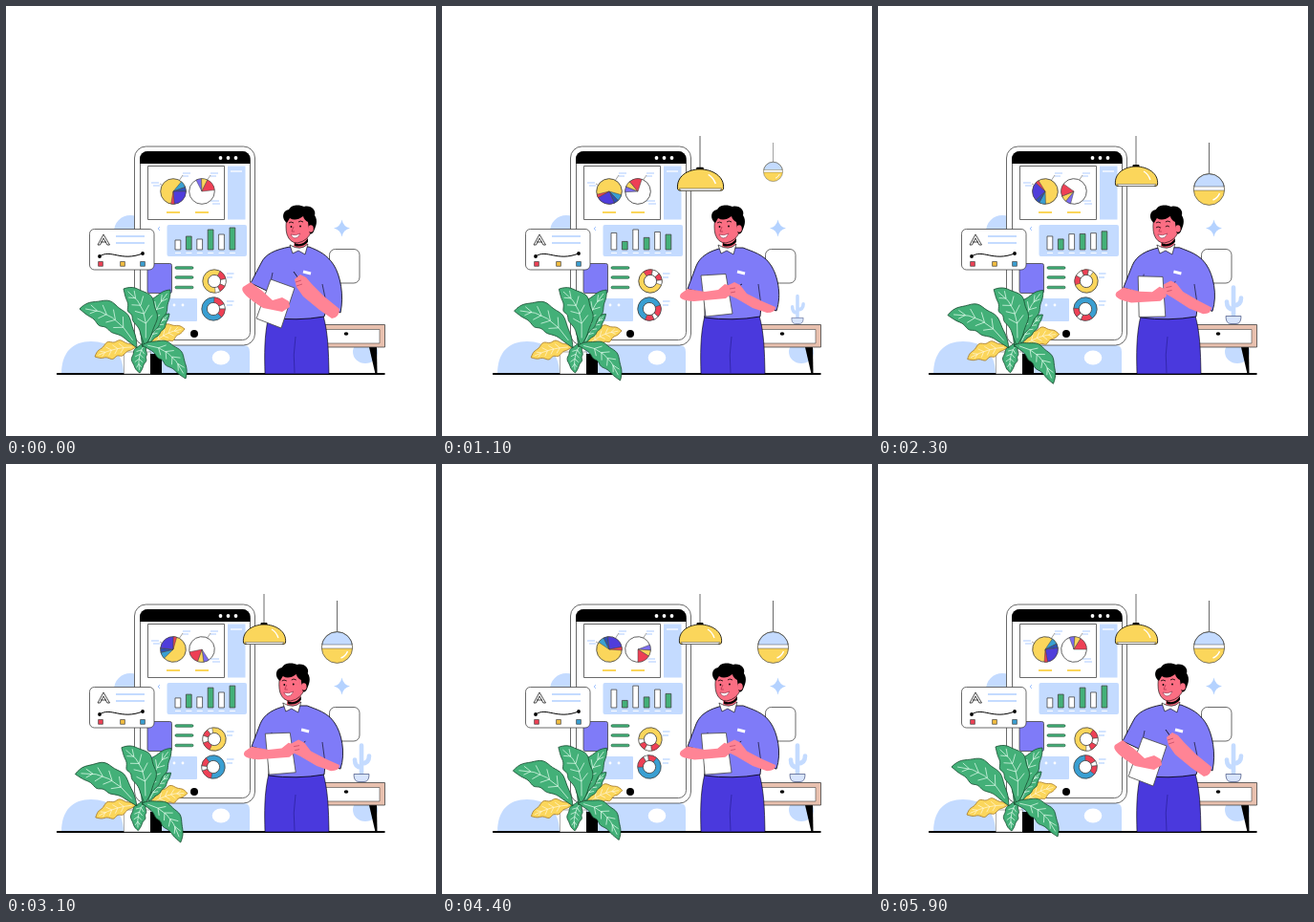
An HTML page with a canvas for the animation above (6 s loop, 450 by 450 pixels).

```html
<!DOCTYPE html>
<html lang="en">
<head>
<meta charset="utf-8">
<title>Dashboard presentation</title>
<style>
html, body { margin: 0; width: 100%; height: 100%; overflow: hidden; background: #fff }
canvas { display: block; width: 450px; height: 450px }
</style>
</head>
<body>
<canvas id="stage"></canvas>
<script>
const LOOP = 6000, TAU = Math.PI * 2, RAD = Math.PI / 180;
const INK = '#000', FRAME = '#444', SKY = '#c4dbff', SHIRT = '#7f7bf8', PANTS = '#4a39dd', FACE = '#fb6e83',
  SKIN = '#ff8495', YELLOW = '#fbd65b', GREEN = '#43b078', RED = '#ee4055', BLUE = '#3a9fd2', PURPLE = '#4f3ddb';
const canvas = document.getElementById('stage'), ctx = canvas.getContext('2d');
const dpr = window.devicePixelRatio || 1;
canvas.width = canvas.height = 450 * dpr;

function paint(path, fill, stroke, width = 0.8) {
  if (fill) { ctx.fillStyle = fill; ctx.fill(path); }
  if (stroke) { ctx.strokeStyle = stroke; ctx.lineWidth = width; ctx.stroke(path); }
}
const shape = (d, fill, stroke, width) => paint(new Path2D(d), fill, stroke, width);
const line = (d, color = INK, width = 0.8) => shape(d, null, color, width);
function box(x, y, w, h, r, fill, stroke, width) {
  const p = new Path2D();
  p.roundRect(x, y, w, h, r);
  paint(p, fill, stroke, width);
}
function oval(x, y, rx, ry, fill, stroke, width) {
  const p = new Path2D();
  p.ellipse(x, y, rx, ry, 0, 0, TAU);
  paint(p, fill, stroke, width);
}
function placed(x, y, angle, scale, draw) {
  ctx.save();
  ctx.translate(x, y);
  ctx.rotate(angle * RAD);
  ctx.scale(scale, scale);
  draw();
  ctx.restore();
}
// Blends two path strings with the same commands.
function blend(a, b, k) {
  const nums = b.match(/-?[\d.]+/g);
  let i = 0;
  return a.replace(/-?[\d.]+/g, n => (+n + (nums[i++] - n) * k).toFixed(2));
}
const smooth = k => k * k * (3 - 2 * k);
function keyed(keys, t) {
  const i = keys.findIndex(k => k[0] > t);
  if (i < 0) return keys[keys.length - 1][1];
  const [t0, a] = keys[i - 1], [t1, b] = keys[i];
  return a + (b - a) * smooth((t - t0) / (t1 - t0));
}
function pop(t, start, length) {
  const k = Math.min(1, (t - start) / length) - 1;
  return k <= -1 ? 0 : 1 + 2.7 * k ** 3 + 1.7 * k ** 2;
}

// Slices are [from, to, color] in degrees; an inner radius makes a ring.
function pie(x, y, r, inner, base, slices, turn) {
  placed(x, y, turn, 1, () => {
    oval(0, 0, r, r, base, FRAME);
    for (const [from, to, color] of slices) {
      const p = new Path2D();
      p.moveTo(0, 0);
      p.arc(0, 0, r, from * RAD, to * RAD);
      p.closePath();
      paint(p, color, FRAME, 0.5);
    }
    if (inner) oval(0, 0, inner, inner, '#fff', FRAME);
  });
}

function backdrop() {
  shape('M58 385C58 362 70 351 89 351S123 362 123 385Z', SKY);
  shape('M150 385V355H249Q255 355 255 362V385Z', SKY);
  oval(225, 368, 9.3, 7.5, '#fff');
  oval(130, 236, 17, 17, SKY);
  oval(376, 362, 13, 12, SKY);
  shape('M351.500 223.500Q353 231 360 232.500Q353 234 351.500 241.500Q350 234 343 232.500Q350 231 351.500 223.500Z', '#b4d2ff');
  line('M53 385H396.500', INK, 1.8);
}

function phone(t) {
  const turn = t / LOOP * 360;
  box(134.5, 147, 126, 208, 12, '#fff', FRAME);
  box(140.5, 152.5, 115, 197, 8, '#fff', FRAME);
  box(140, 152, 115.5, 13, [8, 8, 0, 0], INK);
  for (const x of [224.5, 232.5, 240.5]) oval(x, 159, 1.9, 1.9, '#fff');
  oval(197, 343, 4, 4, INK);

  box(148.5, 167.5, 80, 56, 0, '#fff', FRAME);
  box(232, 167.5, 18.5, 56, 0, SKY);
  line('M235 173H247', '#fff', 1.3);
  line('M152 185H160M154 188H161M185 175H193M185 178H191M214 175H222M214 178H220M214 204H223M216 207H224', '#a4c6ff', 0.9);
  line('M161 186L166 189M185 177L181 183M214 177L210 183', FRAME, 0.5);
  line('M168 216H182M198 216H212', YELLOW, 1.8);
  pie(175, 194, 13.3, 0, YELLOW,
    [[-50, -20, BLUE], [-20, 0, '#2d50b5'], [0, 85, PURPLE], [85, 100, RED]], turn);
  pie(205, 194, 13.3, 0, '#fff',
    [[-117, -92, '#7b6cf0'], [-92, -64, YELLOW], [-64, -6, RED]], -turn);

  line('M161 231L159 233L161 235', '#8fb8ff');
  box(168.500, 229, 83.5, 33, 2, SKY);
  const wave = (1 - Math.cos(t / 3000 * TAU)) / 2;
  [[245, 236], [241, 247.5], [244, 232], [234, 244], [239, 236], [232, 240.5]].forEach(([low, high], i) => {
    const x = 177 + i * 11.4, top = low + (high - low) * wave;
    box(x, top, 5.8, 255 - top, 0, i % 2 ? GREEN : '#fff', FRAME, 0.8);
    line(`M${x} 258.500h6`, '#fff', 1);
  });

  box(148, 269.5, 25.5, 31, 2, SHIRT, FRAME);
  for (const y of [274, 284, 294.5]) box(177, y - 1.3, 19, 2.6, 1.3, GREEN, '#174d30', 0.6);
  pie(218, 288, 12.2, 6.6, YELLOW,
    [[-60, -12, RED], [-12, 25, '#fff'], [25, 60, RED], [60, 85, '#fff']], -turn);
  pie(217, 317, 12.2, 6.6, BLUE,
    [[-85, -25, RED], [-25, 0, '#fff'], [0, 45, RED]], turn);
  line('M231 280H238.500M231 284H237M231 309H238.500M231 313H237', SKY, 1.6);
  box(151, 306, 49, 24, 1, SKY);
  for (let x = 158; x < 190; x += 9) oval(x, 313, 1.4, 1.4, '#fff');
}

function card() {
  box(87.5, 233.5, 67.5, 42.5, 5, '#fff', FRAME);
  line('M96 250L102 239L108.500 250H106L102 243L98.500 250ZM99 247H105', INK, 0.7);
  line('M115 241H145M115 248H145', SKY, 2);
  line('M98 262C110 254 120 268 143 259', INK, 1);
  oval(98, 262, 1.9, 1.9, INK);
  oval(143, 259, 1.9, 1.9, INK);
  [[99, RED], [122, '#f2bd3f'], [143, BLUE]].forEach(([x, c]) => box(x - 2.4, 267.500, 4.8, 4.8, 0, c, FRAME, 0.7));
}

function furniture(t) {
  box(338.500, 254.500, 31.5, 35.5, 6, '#fff', FRAME);
  shape('M380 357H388L388.500 385H386.500Z', INK);
  box(329, 333.5, 67.5, 23.5, 0, '#e8c0ae', FRAME);
  box(333, 338.5, 58, 14.5, 0, '#fff', FRAME, 0.6);
  oval(356, 343, 2.3, 1.8, INK);
  placed(372, 332.500, 0, pop(t, 830, 1200), () => {
    ctx.lineCap = 'round';
    line('M0 -8V-38M0 -15Q-7 -15 -7 -23M0 -19Q8 -19 8 -27', SKY, 4.6);
    ctx.lineCap = 'butt';
    shape('M-8 -8H8Q8 0 3 0H-3Q-8 0 -8 -8Z', '#d7e4fd', '#56628c', 0.8);
  });
}

function lamps(t) {
  placed(270, 136, 0, pop(t, 300, 1200), () => {
    line('M0 0V31', FRAME);
    box(-3.5, 30, 7, 3, 1, INK);
    shape('M-21.500 51C-23 39 -12 32 0 32S24 39 22.500 51Q22 52.500 20 52.500H-19Q-21 52.500 -21.500 51Z', YELLOW, INK);
    shape('M-20 50.500H21L19 52.500H-18Z', '#fff', FRAME, 0.5);
    line('M15 46Q13 40 8 37', '#fff', 1.3);
  });
  placed(346.5, 143, 0, pop(t, 900, 1200), () => {
    line('M0 0V33', FRAME, 0.8);
    oval(0, 49, 16.2, 16.4, YELLOW);
    box(-16, 46, 32, 4, 0, '#fff');
    shape('M-15.930 46A16.200 16.400 0 0 1 15.930 46Z', SKY, FRAME, 0.5);
    line('M-16 50H16', FRAME, 0.5);
    oval(0, 49, 16.2, 16.4, null, FRAME, 0.7);
    line('M4 60Q9 58 11 53', '#fff', 1.4);
  });
}

const LEAN = [[0, 1], [900, 0], [1200, 0], [2300, 0.2], [3100, 0.05], [3700, 0.2], [4800, 0], [5100, 0], [5850, 1]];

function head(closed) {
  shape('M302 240L301 252Q308 257 315 250L316 238Z', FACE);
  shape('M302 248Q310 252 316 243L316 247Q310 253 302 251Z', INK);
  shape('M294 220Q292 232 294 239Q297 248 305 248Q316 246 320 235L320 219L304 215Z', FACE, INK, 0.6);
  shape('M294 227C288 223 289 214 296 213C299 207 308 208 312 210C319 208 325 214 323 219C327 225 324 231 322 236'
    + 'C320 240 317 239 317 234L316 226Q312 224 311 220Q303 226 297 222Z', INK);
  oval(319, 233, 2.8, 3.8, FACE);
  line('M296 227Q298 225 301 227M306 226Q308 224 311 226', INK, 0.8);
  if (closed) line('M296 232Q298 230 301 232M306 231Q308 229 310 231', INK, 0.8);
  else { oval(298.5, 231, 0.9, 1.1, INK); oval(308, 230.5, 0.9, 1.1, INK); }
  line('M301 231L299 236L302 236', '#a52f48', 0.7);
  shape('M298 239Q303 241 308 238Q306 243.500 302 243Q299 242 298 239Z', '#fff', '#8d2540', 0.6);
}

function man(t) {
  const k = keyed(LEAN, t), shift = -8 * (1 - k) ** 2;
  const part = (upright, leaning, fill, stroke = INK, width) => shape(blend(upright, leaning, k), fill, stroke, width);
  shape('M275 324C270 345 270.500 365 271 385H338C337.500 360 337 342 332 324Z', PANTS, INK, 0.6);
  line('M303 346Q300 365 302 384', '#2d22a0', 0.8);
  part('M294 253C280 256 270 262 266 272L257 296L275 301L275 326Q304 330 333 325L334 314L350 319C356 302 351 281 344 271C337 260 325 257 315 253Z',
    'M297 252C281 255 271 260 267 269L256 290L275 299L275 326Q304 330 333 325L336 315L350 321C354 303 350 282 343 271C336 260 327 256 317 252Z', SHIRT);
  line(blend('M275 301L278 281M334 314L331 291', 'M275 299L279 279M336 315L331 291', k), INK, 0.6);
  placed(shift, 0, 0, 1, () => {
    head(t > 2150 && t < 2450);
    shape('M297 250L300 259L306 256L313 260L316 249Q308 257 297 250Z', '#fff', INK, 0.6);
  });
  line(blend('M309 278L317 280', 'M311 278L319 280', k), '#fff', 3);
  part('M271 282L297 280.500L304 322L276 325Z', 'M277 286L302 295L288 337L262 327Z', '#fff', FRAME);
  part('M257 296L275 299L289 297L296 291L302 293L303 301L297 306L264 309Q245 308 250 301Z',
    'M256 289L268 298L279 308L289 305L296 309L297 315L289 320L269 316Q243 300 248 294Z', SKIN, null);
  line(blend('M302 298L314 291', 'M306 285L301 278', k), INK, 0.8);
  part('M298 293L306 289L312 292L319 301L335 309L349 315Q349 321 340 321L325 316L308 306L299 302Z',
    'M302 286L308 281L314 284L320 291L333 304L349 317Q349 326 341 327L328 318L311 304L304 294Z', SKIN, null);
  line(blend('M301 296L307 295M302 300L307 299', 'M303 289L309 287M304 293L310 291', k), '#b03a55', 0.6);
}

// A leaf follows a curved rib [base, bend, tip] and swings about its base.
function leaf([bx, by, cx, cy, tx, ty], width, swing, [fill, edge, vein], ripple = 0.08) {
  placed(bx, by, swing, 1, () => {
    const at = (u, side) => {
      const v = 1 - u, x1 = cx - bx, y1 = cy - by, x2 = tx - bx, y2 = ty - by;
      const dx = v * x1 + u * (x2 - x1), dy = v * y1 + u * (y2 - y1), n = side / Math.hypot(dx, dy);
      return `${(2 * u * v * x1 + u * u * x2 - dy * n).toFixed(2)} ${(2 * u * v * y1 + u * u * y2 + dx * n).toFixed(2)}`;
    };
    const half = u => width / 2 * Math.sin(Math.PI * u ** 1.15) ** 0.85 * (1 + ripple * Math.sin(u * 22));
    const left = [], right = [];
    for (let i = 0; i < 30; i++) {
      left.push(at(i / 30, half(i / 30)));
      right.unshift(at(i / 30, -half(i / 30)));
    }
    shape(`M${[...left, at(1, 0), ...right].join('L')}Z`, fill, edge, 0.8);
    let ribs = `M${at(0.1, 0)}L${at(0.3, 0)}L${at(0.5, 0)}L${at(0.7, 0)}L${at(0.92, 0)}`;
    for (let u = 0.3; u < 0.8; u += 0.15)
      for (const side of [-0.6, 0.6]) ribs += `M${at(u, 0)}L${at(u + 0.1, side * half(u + 0.1))}`;
    line(ribs, vein, 0.7);
  });
}

function plant(t) {
  const s = (1 - Math.cos(t / LOOP * TAU)) / 2;
  const green = [GREEN, '#174d30', '#e9fff2'], gold = [YELLOW, '#a57826', '#fff6d8'];
  box(123.5, 362, 28, 23, 0, '#fff', '#777', 0.6);
  box(151, 364, 12, 21, 0, INK);
  leaf([136, 357, 115, 356, 93, 367], 17, -4 * s, gold, 0.14);
  leaf([150, 358, 164, 340, 187, 338], 17, 10 * s, gold, 0.14);
  leaf([149, 354, 155, 336, 171, 322], 13, 3 * s, green);
  leaf([147, 352, 136, 364, 140, 384], 15, 3 * s, green);
  leaf([143, 357, 151, 320, 172, 297], 21, s, green);
  leaf([137, 358, 116, 315, 77, 317], 27, -7 * s, green);
  leaf([145, 356, 153, 312, 123, 296], 28, -2 * s, green);
  leaf([142, 355, 174, 354, 188, 390], 21, 8 * s, green);
}

function frame(now) {
  const t = now % LOOP;
  ctx.setTransform(dpr, 0, 0, dpr, 0, 0);
  ctx.fillStyle = '#fff';
  ctx.fillRect(0, 0, 450, 450);
  ctx.lineJoin = 'round';
  backdrop();
  phone(t);
  furniture(t);
  lamps(t);
  man(t);
  card();
  plant(t);
}

const start = performance.now();
(function tick() {
  frame(performance.now() - start);
  requestAnimationFrame(tick);
})();
</script>
</body>
</html>
```
